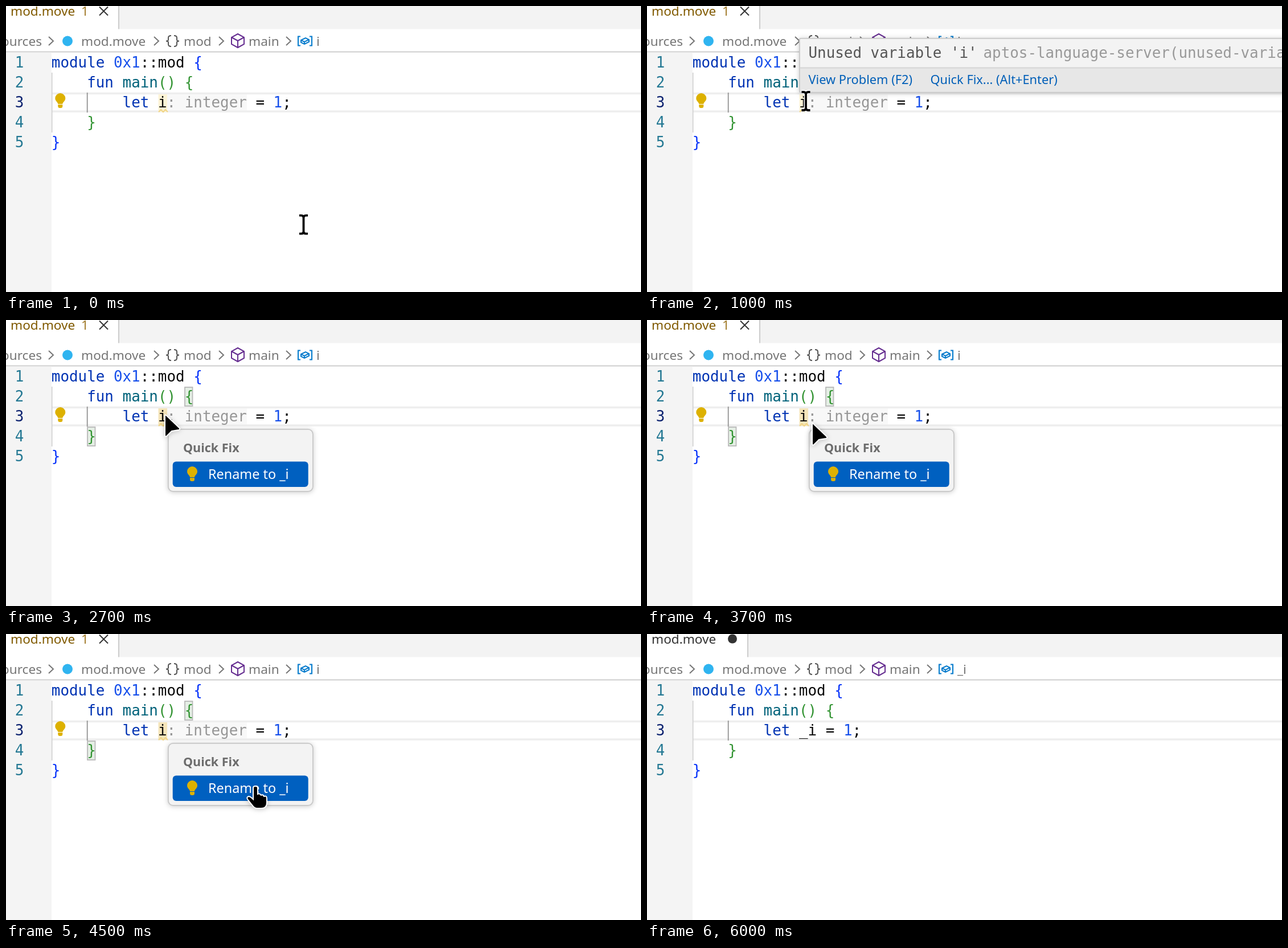
These frames come from a looping animation (1115x502 px, 6200 ms). An HTML page:

```html
<!DOCTYPE html>
<html lang="en">
<head>
<meta charset="utf-8">
<title>Quick fix: rename unused variable</title>
<style>
  html, body { margin: 0; width: 100%; height: 100%; overflow: hidden; background: #fff; }
  svg { display: block; width: 100vw; height: 100vh; }
  text { white-space: pre; font: 22.6px "Noto Sans", sans-serif; }
  .code, .code text { font: 25.9px "DejaVu Sans Mono", monospace; fill: #080808; }
  .code .kw { fill: #0033b3; }
  .code .num { fill: #1750eb; }
  .code .fn { fill: #00627a; }
  .code .b1 { fill: #0431fa; }
  .code .b2 { fill: #319331; }
  .code .hint { fill: #969696; }
  .code .lines text { fill: #237893; }
  .code .lines .active { fill: #0b216f; }
  .crumb text { fill: #767676; }
  .line { fill: none; stroke-width: 2; }
  .small { font-size: 21.8px; fill: #005fb8; }
  .pair rect { fill: #e5efe5; stroke: #b9b9b9; stroke-width: 1.8; }
  .shadow { filter: drop-shadow(0 1px 4px rgba(0, 0, 0, .2)); }
</style>
</head>
<body>
<svg viewBox="0 0 1115 502">
  <defs>
    <path id="chevron" class="line" stroke="#767676" d="M-4-7.5L4 0-4 7.5"/>
    <g id="bulb" fill="#ddb100">
      <path d="M-4 7C-4 4-9 2-9-3A9 9 0 0 1 9-3C9 2 4 4 4 7Z"/>
      <path d="M-4 8H4V11Q4 14 1 14H-1Q-4 14-4 11Z"/>
    </g>
    <path id="ibeam" fill="none" d="M-7.500-16H-4Q0-16 0-12V12Q0 16-4 16H-7.500M7.500-16H4Q0-16 0-12V12Q0 16 4 16H7.500"/>
  </defs>

  <!-- tab strip -->
  <rect width="1115" height="40.5" fill="#f3f3f3"/>
  <rect id="tab" width="198" height="41" fill="#fff"/>
  <path id="tabEdge" d="M0 0V40.5" stroke="#c8c8c8" stroke-width="1.8"/>
  <text id="title" x="8" y="17">mod.move</text>
  <g id="warnTab">
    <text x="132" y="17" fill="#a27c2c">1</text>
    <path class="line" stroke="#333" d="M164 1.5L179 16.5M179 1.5L164 16.5"/>
  </g>
  <circle id="dirtyDot" cx="150" cy="8.5" r="8" fill="#333"/>

  <!-- breadcrumbs -->
  <g class="crumb">
    <text x="63" y="70" text-anchor="end">sources</text>
    <use href="#chevron" x="79" y="61.5"/>
    <circle cx="108" cy="61.5" r="9" fill="#2fb4f0"/>
    <text x="132" y="70">mod.move</text>
    <use href="#chevron" x="264" y="61.5"/>
    <path class="line" stroke="#555" d="M290 52Q285 52 285 56V59Q285 61.5 281 61.5Q285 61.5 285 64V67Q285 71 290 71M295 52Q300 52 300 56V59Q300 61.5 304 61.5Q300 61.5 300 64V67Q300 71 295 71"/>
    <text x="312" y="70">mod</text>
    <use href="#chevron" x="378" y="61.5"/>
    <path class="line" stroke="#652d90" d="M407 49L418 55V67L407 73 396 67V55ZM396 55L407 61 418 55M407 61V73"/>
    <text x="426" y="70">main</text>
    <use href="#chevron" x="496" y="61.5"/>
    <path class="line" stroke="#007acc" d="M517 53.5H513V69.5H517M533 53.5H537V69.5H533M518 60L526 56 532 59V63L524 67 518 64ZM518 60L524 63 532 59M524 63V67"/>
    <text id="crumbName" x="545" y="70">i</text>
  </g>
  <path d="M0 80.5H1115" stroke="#cecece" stroke-width="1.8"/>

  <!-- editor -->
  <rect y="81.5" width="80" height="421" fill="#f4f4f4"/>
  <path d="M80 153.5H1115M80 185H1115" stroke="#eee" stroke-width="3.4"/>
  <path d="M80.7 117V222" stroke="#d3d3d3" stroke-width="1.8"/>
  <path d="M142.7 152V187" stroke="#939393" stroke-width="1.8"/>
  <g id="brackets" class="pair">
    <rect x="314" y="118" width="13.5" height="33"/>
    <rect x="143" y="188" width="13.5" height="33"/>
  </g>
  <rect id="hintBox" y="155" width="140" height="28" fill="#f8f8f8"/>
  <g id="warning">
    <rect id="wordBox" x="267.5" y="155" width="15.5" height="31"/>
    <path class="line" stroke="#f0d588" stroke-width="1.8" d="M268 186L272 182 276 186 280 182 284 186"/>
  </g>
  <use id="gutterBulb" href="#bulb" x="95.3" y="165"/>
  <g class="code">
    <g class="lines">
      <text x="15.7" y="107.5">1</text>
      <text x="15.7" y="142.7">2</text>
      <text class="active" x="15.7" y="177.9">3</text>
      <text x="15.7" y="213.1">4</text>
      <text x="15.7" y="248.3">5</text>
    </g>
    <text x="79.8" y="107.5"><tspan class="kw">module</tspan> <tspan class="num">0x1</tspan>::mod <tspan class="b1">{</tspan></text>
    <text x="142.2" y="142.7"><tspan class="kw">fun</tspan> <tspan class="fn">main</tspan><tspan class="b2">() {</tspan></text>
    <text x="204.6" y="177.9"><tspan class="kw">let</tspan> <tspan id="name">i</tspan><tspan id="hint" class="hint">: integer</tspan> = <tspan class="num">1</tspan>;</text>
    <text x="142.2" y="213.1" class="b2">}</text>
    <text x="79.8" y="248.3" class="b1">}</text>
  </g>
  <rect id="caret" y="152" width="3.4" height="35" fill="#000"/>

  <!-- hover card -->
  <g id="hover">
    <rect class="shadow" x="267.9" y="56.9" width="900" height="94.5" rx="2" fill="#f3f3f3" stroke="#c8c8c8" stroke-width="1.8"/>
    <path d="M269 108.5H1115V150.5H269Z" fill="#e7e7e7"/>
    <path d="M268 108.5H1115" stroke="#d4d4d4" stroke-width="1.8"/>
    <g class="code">
      <text x="283.5" y="90.5" style="fill:#555">Unused variable 'i'</text>
      <text x="590.5" y="90.5" style="fill:#999">aptos-language-server(unused-variable)</text>
    </g>
    <text class="small" x="283.5" y="137">View Problem (F2)</text>
    <text class="small" x="497.5" y="137">Quick Fix... (Alt+Enter)</text>
  </g>

  <!-- quick fix menu -->
  <g id="menu">
    <rect class="shadow" x="284.9" y="191.9" width="254" height="109" rx="8.5" fill="#f3f3f3" stroke="#c8c8c8" stroke-width="1.8"/>
    <text x="311" y="231.5" fill="#6c6c6c" style="font-size:21.5px;font-weight:700">Quick Fix</text>
    <rect x="292.7" y="248.5" width="238" height="44.5" rx="6" fill="#0060c0"/>
    <use href="#bulb" x="327" y="269"/>
    <text x="355" y="279" fill="#fff" style="font-size:23.4px">Rename to _i</text>
  </g>

  <!-- pointers, hot spot at 0,0 -->
  <g id="pointer">
    <g id="beam">
      <use href="#ibeam" stroke="#fff" stroke-width="7"/>
      <use href="#ibeam" stroke="#000" stroke-width="3.8"/>
    </g>
    <path id="arrow" class="shadow" stroke="#fff" stroke-width="2" d="M0 1V36Q1 39 4 36L12 28 24 26Q28 25 25 22L2 0Q0-1 0 1Z"/>
    <path id="hand" class="shadow" stroke="#fff" stroke-width="2" d="M-4 2Q-4-1 0-1T4 2V13Q7 11 10 15Q13 13 15 17Q20 15 20 21V28Q20 38 10 38H3Q-2 38-6 32L-14 22Q-16 18-12 17Q-9 17-4 22Z"/>
  </g>
</svg>
<script>
const LOOP = 6200, STEP = 100;
const $ = id => document.getElementById(id);
const show = (id, on) => { $(id).style.display = on ? '' : 'none'; };
const within = (t, from, to) => t >= from && t < to;
const mix = (a, b, u) => a + (b - a) * u;
const smooth = u => u * u * (3 - 2 * u);

// Pointer places from 3700 ms, one per step
const menuPath = [[290, 182], [330, 232], [375, 284], [408, 320], [420, 329],
                  [427, 306], [435, 275], [437, 270], [438, 268]];

function pointerAt(t) {
  if (t < 3700) {
    const u = smooth(Math.min(t / 700, 1));
    return [mix(522.5, 279, u), mix(383.7, 167, u)];
  }
  if (t < 5200) return menuPath[Math.min((t - 3700) / STEP, menuPath.length - 1)];
  const u = smooth(Math.min((t - 5100) / 600, 1));
  return [mix(438, 412, u), mix(268, -50, u)];
}

function pointerKind(t, x, y) {
  if (!within(t, 2700, 4700)) return y < 81 ? 'arrow' : 'beam';
  return within(x, 293, 531) && within(y, 248, 293) ? 'hand' : 'arrow';
}

function draw(time) {
  const t = Math.floor(time % LOOP / STEP) * STEP;
  const renamed = t >= 4700, cleared = t >= 4800;

  $('tab').setAttribute('width', cleared ? 177 : 198);
  $('tabEdge').setAttribute('transform', `translate(${cleared ? 177 : 198})`);
  $('title').setAttribute('fill', cleared ? '#333' : '#805a00');
  show('warnTab', !cleared);
  show('dirtyDot', cleared);

  $('name').textContent = renamed ? '_i' : 'i';
  $('hint').textContent = cleared ? '' : ': integer';
  $('hintBox').setAttribute('x', renamed ? 298.6 : 283);
  show('hintBox', !cleared);
  show('warning', !renamed);
  $('wordBox').setAttribute('fill', t < 1700 ? '#fdf4d6' : '#f5e5ba');
  $('crumbName').textContent = t < 5100 ? 'i' : '_i';

  show('brackets', within(t, 1700, 6000));
  show('gutterBulb', t < 5400);
  show('caret', within(t, 1600, 2100) || within(t, 2600, 2700) ||
                within(t, 4700, 5200) || within(t, 5700, 6000));
  $('caret').setAttribute('x', renamed ? 296.8 : 281.8);

  show('hover', within(t, 900, 1600));
  $('hover').style.opacity = t < 1000 ? .6 : 1;
  show('menu', within(t, 2700, 4700));

  const [x, y] = pointerAt(t), kind = pointerKind(t, x, y);
  $('pointer').setAttribute('transform', `translate(${x} ${y})`);
  for (const id of ['beam', 'arrow', 'hand']) show(id, id === kind);
}

const start = performance.now();
function tick() {
  draw(performance.now() - start);
  requestAnimationFrame(tick);
}
tick();
</script>
</body>
</html>
```
